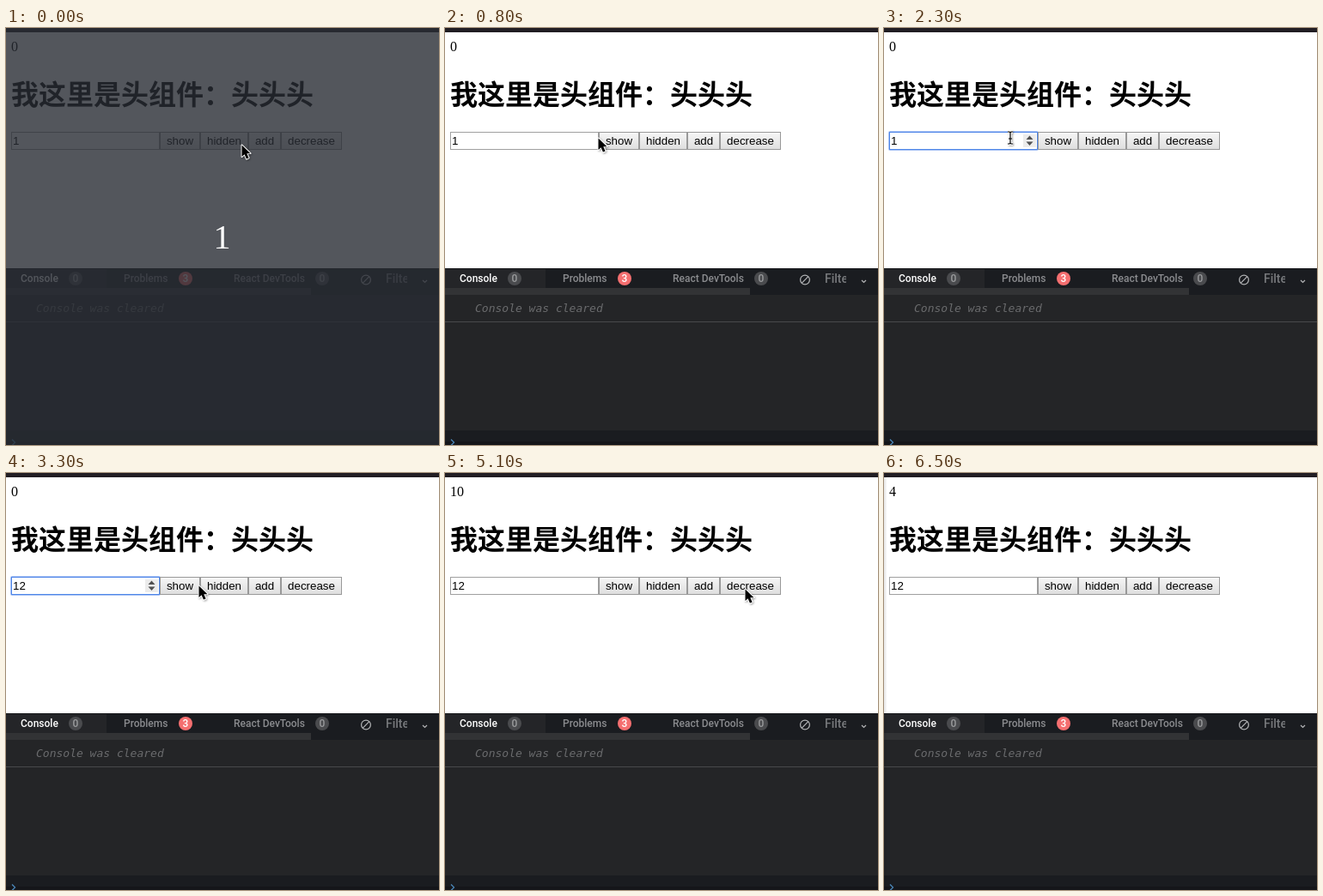
Write an HTML page that moves like this. It is 504 px wide and 486 px high and loops after 7 s.

```html
<!DOCTYPE html>
<html lang="zh">
<head>
<meta charset="utf-8">
<title>Counter demo</title>
<style>
html, body { margin: 0; width: 100%; height: 100%; overflow: hidden; background: #fff; }
svg { display: block; width: 504px; height: 486px; }
text { white-space: pre; }
.serif { font-family: "Liberation Serif", serif; }
.form { font: 13.333px "Liberation Sans", Arial, sans-serif; }
.title { font: bold 32px "Noto Sans CJK SC", "Noto Sans CJK", sans-serif; }
.tab { font: 500 12px Roboto, sans-serif; }
.log { font: italic 13px "DejaVu Sans Mono", monospace; }
.mid { text-anchor: middle; }
</style>
</head>
<body>
<svg viewBox="0 0 504 486">
  <defs>
    <linearGradient id="face" x2="0" y2="1">
      <stop stop-color="#f6f6f6"/><stop offset="1" stop-color="#dedede"/>
    </linearGradient>
    <linearGradient id="edge">
      <stop stop-color="#000" stop-opacity=".1"/><stop offset="1" stop-color="#000" stop-opacity=".03"/>
    </linearGradient>
    <clipPath id="filterClip"><rect x="440" y="283" width="27" height="20"/></clipPath>
    <filter id="shadow" x="-50%" y="-50%" width="200%" height="200%">
      <feDropShadow dx="1" dy="1" stdDeviation="1" flood-opacity=".4"/>
    </filter>
  </defs>

  <rect width="504" height="486" fill="#fff"/>
  <rect width="504" height="5" fill="#211d23"/>
  <text id="count" class="serif" x="6" y="27" font-size="16"></text>
  <text class="title" x="6" y="89">我这里是头组件：头头头</text>

  <g id="ring" fill="none">
    <rect x="5.5" y="120.5" width="174" height="22" rx="1" stroke="#a9c3f5"/>
  </g>
  <rect id="field" x="6.5" y="121.5" width="172" height="20" fill="#fff"/>
  <rect id="mark" x="8" y="124" width="7.4" height="15" fill="#3390e8"/>
  <text id="value" class="form" x="8" y="136"></text>
  <rect id="caret" y="124" width="1" height="15"/>
  <g id="spin">
    <rect x="162" y="124" width="15" height="15" fill="#ececec"/>
    <path d="M165.5 130 L169.5 125.5 L173.5 130Z M165.5 132.500 L169.5 137 L173.5 132.500Z" fill="#505050"/>
  </g>
  <g id="buttons" class="form mid"></g>

  <rect y="280" width="504" height="206" fill="#1a1c20"/>
  <rect y="280" width="117" height="23" fill="#242528"/>
  <rect y="280" width="504" height="1" fill="#151619"/>
  <rect y="303" width="355" height="8" fill="#323335"/>
  <rect y="311" width="504" height="158" fill="#242527"/>
  <rect y="342" width="504" height="1" fill="#48494b"/>
  <rect y="482" width="504" height="4" fill="#15161a"/>
  <g id="tabs" class="tab"></g>
  <g fill="none" stroke="#b4b5b7" stroke-width="1.2">
    <circle cx="419" cy="293.500" r="5.400"/>
    <path d="M415.2 297.300 L422.800 289.700"/>
    <path d="M485 294 L487.500 296.500 L490 294"/>
  </g>
  <g clip-path="url(#filterClip)">
    <text class="tab" x="442" y="297" style="font-size:14px" fill="#77797c">Filter</text>
  </g>
  <text class="log" x="35" y="331" fill="#6a6b6d">Console was cleared</text>
  <path d="M7 479.500 L10.500 483 L7 486.500" fill="none" stroke="#4a86b8" stroke-width="1.3"/>

  <rect id="side" y="5" width="3" height="481" fill="url(#edge)"/>
  <g id="veil">
    <rect width="504" height="486" fill="#282c34" fill-opacity=".8"/>
    <text class="serif mid" x="251.500" y="257" font-size="40" fill="#fff">1</text>
  </g>
  <g id="pointer" filter="url(#shadow)">
    <path id="arrow" d="M.5 .5 V14 L3.600 11.200 L5.900 16.600 L8.600 15.400 L6.300 10.200 H10.500Z"
      fill="#000" stroke="#fff" stroke-width="1.800" paint-order="stroke" stroke-linejoin="round"/>
    <g id="beam" fill="none">
      <path d="M-3 -7 H-1 L0 -6 L1 -7 H3 M0 -6 V6 M-3 7 H-1 L0 6 L1 7 H3" stroke="#fff" stroke-width="3"/>
      <path d="M-3 -7 H-1 L0 -6 L1 -7 H3 M0 -6 V6 M-3 7 H-1 L0 6 L1 7 H3 M-2 1 H2" stroke="#000" stroke-width="1.200"/>
    </g>
  </g>
</svg>
<script>
const LOOP = 7000;
const $ = id => document.getElementById(id);
const show = (id, on) => $(id).setAttribute('display', on ? 'inline' : 'none');

function add(parent, tag, attrs, text) {
  const el = document.createElementNS('http://www.w3.org/2000/svg', tag);
  for (const k in attrs) el.setAttribute(k, attrs[k]);
  if (text !== undefined) el.textContent = text;
  return $(parent).appendChild(el);
}

const faces = {};
for (const [label, x, w] of [['show', 179, 47], ['hidden', 226, 56], ['add', 282, 38], ['decrease', 320, 71]]) {
  faces[label] = add('buttons', 'rect', { x: x + .5, y: 121.5, width: w - 1, height: 20, stroke: '#999' });
  add('buttons', 'text', { x: x + w / 2, y: 136 }, label);
}

for (const [label, x, n, cx, ink, badge] of [
  ['Console', 17, 0, 81, '#fff', '#4a4b4e'],
  ['Problems', 137, 3, 209, '#8b8c8f', '#f56f70'],
  ['React DevTools', 265, 0, 368, '#8b8c8f', '#4a4b4e']
]) {
  add('tabs', 'text', { x, y: 296, fill: ink }, label);
  add('tabs', 'circle', { cx, cy: 292, r: 8, fill: badge });
  add('tabs', 'text', { x: cx, y: 296.3, class: 'mid', fill: n ? '#fff' : '#9a9b9d' }, n);
}

// Pointer stops: time, x, y, shape
const stops = [
  [0, 274, 136, 'arrow'], [100, 289, 137, 'arrow'], [200, 303, 140, 'arrow'],
  [500, 291, 140, 'arrow'], [600, 262, 137, 'arrow'], [700, 220, 132, 'arrow'],
  [800, 178, 128, 'arrow'], [900, 151, 123, 'beam'], [1000, 147, 121, 'beam'],
  [1400, 147, 125, 'beam'], [1500, 147, 128, 'beam'],
  [3100, 154, 127, 'beam'], [3200, 182, 128, 'arrow'], [3300, 224, 131, 'arrow'],
  [3400, 266, 133, 'arrow'], [3500, 295, 135, 'arrow'], [3600, 305, 136, 'arrow'],
  [4500, 349, 135, 'arrow'], [6500, 0, 0, '']
];
// Moments at which "decrease" goes down and comes up again
const downs = [4800, 5000, 5200, 5400, 5600, 6000, 6300];
const ups = [4900, 5100, 5300, 5500, 5700, 5800, 6200, 6400];

const within = (t, a, b) => t >= a && t < b;
const passed = (list, t) => list.filter(v => v <= t);
const last = list => list.length ? list[list.length - 1] : -1;

function draw(t) {
  const focus = within(t, 1200, 3800);
  const [, x, y, shape] = last(stops.filter(s => s[0] <= t));
  const pressed = {
    add: within(t, 3900, 4500),
    decrease: last(passed(downs, t)) > last(passed(ups, t))
  };
  const marked = within(t, 1200, 1700);
  const typed = t >= 2700;

  $('count').textContent = t < 4500 ? 0 : 12 - passed(ups, t).length;
  $('value').textContent = typed ? '12' : '1';
  $('value').setAttribute('fill', marked ? '#fff' : '#000');
  $('field').setAttribute('stroke', focus ? '#4f86e8' : '#a0a0a0');
  $('caret').setAttribute('x', typed ? 23 : 15);
  show('ring', focus);
  show('mark', marked);
  show('caret', within(t, 1700, 2300) || within(t, 2700, 3300));
  show('spin', within(t, 900, 3800));
  for (const k in faces) faces[k].setAttribute('fill', pressed[k] ? '#dcdcdc' : 'url(#face)');

  show('veil', t < 100);
  show('side', t >= 6500);
  show('pointer', shape);
  show('arrow', shape === 'arrow');
  show('beam', shape === 'beam');
  $('pointer').setAttribute('transform', `translate(${x} ${y})`);
}

function tick() {
  draw(performance.now() % LOOP);
  requestAnimationFrame(tick);
}
tick();
</script>
</body>
</html>
```
